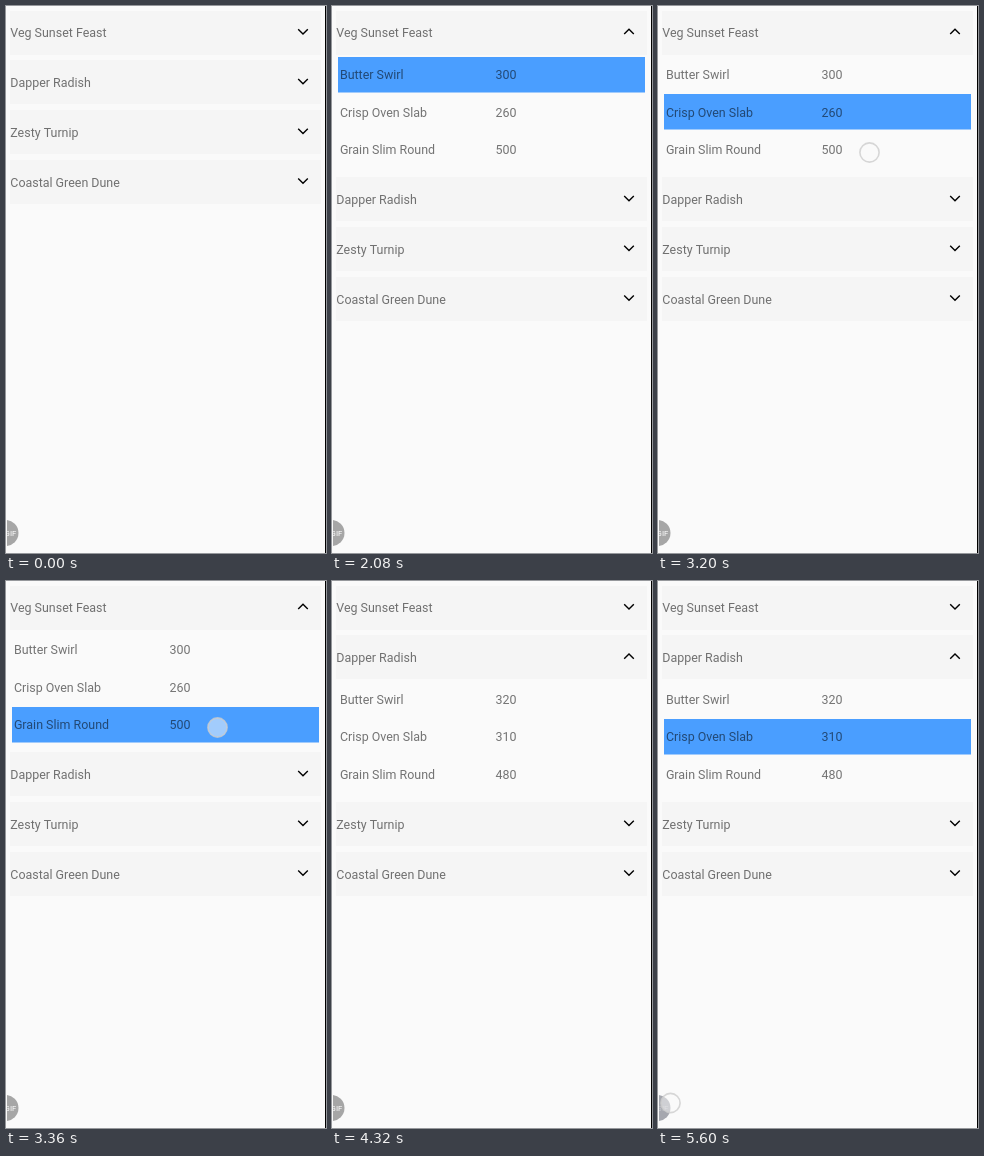
These frames come from a looping animation (320x547 px, 5.76 s). An HTML page with a canvas:

```html
<!DOCTYPE html>
<html lang="en">
<head>
<meta charset="utf-8">
<title>Expandable menu</title>
<style>
  html, body { margin: 0; width: 100%; height: 100%; overflow: hidden; background: #fafafa; }
  canvas { display: block; width: 320px; height: 547px; }
</style>
</head>
<body>
<canvas id="stage"></canvas>
<script>
const W = 320, H = 547, LOOP = 5760;
const HEADER_PITCH = 49.7, ROW_PITCH = 37.3, FULL = 117;
const INK = 'rgba(0,0,0,.54)';

const groups = [
  { name: 'Veg Sunset Feast', prices: [300, 260, 500] },
  { name: 'Dapper Radish', prices: [320, 310, 480] },
  { name: 'Zesty Turnip', prices: [] },
  { name: 'Coastal Green Dune', prices: [] }
];
const crusts = ['Butter Swirl', 'Crisp Oven Slab', 'Grain Slim Round'];

// Each step lists only what changes: section heights, active group,
// selected [group, row], and the touch point [x, y, strength].
const steps = [
  { at: 0, open: [0, 0], active: -1, selected: null, touch: null },
  { at: 320, touch: [211.5, 17.5, 1] },
  { at: 480, touch: [211.8, 17.8, 0.7] },
  { at: 640, touch: null, open: [1, 0], active: 0 },
  { at: 960, open: [8, 0] },
  { at: 1120, open: [FULL, 0] },
  { at: 1760, touch: [219.5, 63.5, 1] },
  { at: 1920, selected: [0, 0] },
  { at: 2080, touch: null },
  { at: 2560, selected: [0, 1], touch: [215, 105, 1] },
  { at: 2720, touch: null },
  { at: 3200, touch: [211.5, 146.5, 1] },
  { at: 3360, selected: [0, 2] },
  { at: 3520, touch: null },
  { at: 4000, open: [122.4, 0], active: 1, touch: [198, 198, 1] },
  { at: 4160, open: [60, 58], touch: null },
  { at: 4320, open: [0, FULL], selected: null },
  { at: 4800, selected: [1, 1], touch: [212, 156, 1] },
  { at: 4960, touch: null },
  { at: 5600, touch: [12.5, 522, 1], pressed: true }
];

const canvas = document.getElementById('stage');
const ctx = canvas.getContext('2d');
const ratio = window.devicePixelRatio || 1;
canvas.width = W * ratio;
canvas.height = H * ratio;

function stateAt(time) {
  return Object.assign({}, ...steps.filter(step => step.at <= time));
}

function rect(x, y, w, h, color) {
  ctx.fillStyle = color;
  ctx.fillRect(x, y, w, h);
}

function text(value, x, y, color = INK, font = '12.44px Roboto, sans-serif') {
  ctx.font = font;
  ctx.fillStyle = color;
  ctx.fillText(value, x, y);
}

function chevron(y, up) {
  const bend = up ? -2.4 : 2.4;
  ctx.beginPath();
  ctx.moveTo(292.2, y - bend);
  ctx.lineTo(297, y + bend);
  ctx.lineTo(301.8, y - bend);
  ctx.strokeStyle = '#000';
  ctx.lineWidth = 1.4;
  ctx.stroke();
}

function drawRows(group, index, top, height, selected) {
  ctx.save();
  ctx.beginPath();
  ctx.rect(0, top, W, height);
  ctx.clip();
  group.prices.forEach((price, row) => {
    const y = top + 1.6 + row * ROW_PITCH;
    if (selected && selected[0] === index && selected[1] === row) {
      rect(6, Math.round(y), 307, 35.5, '#4a9eff');
    }
    text(crusts[row], 7.9, y + 22.2);
    text(price, 163.6, y + 22.2);
  });
  ctx.restore();
}

function drawButton(pressed) {
  ctx.save();
  ctx.beginPath();
  ctx.rect(1, 500, 30, H - 500);
  ctx.clip();
  ctx.beginPath();
  ctx.arc(-0.5, 527, 13, 0, Math.PI * 2);
  ctx.fillStyle = pressed ? '#a5a7ae' : '#a6a6a6';
  ctx.fill();
  text('GIF', -1.4, 529.8, pressed ? '#c4c6cc' : '#fff', '7.8px Roboto, sans-serif');
  ctx.restore();
}

function drawTouch([x, y, strength]) {
  ctx.save();
  ctx.globalAlpha = strength;
  ctx.beginPath();
  ctx.arc(x, y, 9.6, 0, Math.PI * 2);
  ctx.fillStyle = 'rgba(250,250,250,.5)';
  ctx.fill();
  ctx.strokeStyle = 'rgba(205,205,205,.8)';
  ctx.lineWidth = 1.6;
  ctx.stroke();
  ctx.restore();
}

function draw(time) {
  const state = stateAt(time);
  ctx.setTransform(ratio, 0, 0, ratio, 0, 0);
  rect(0, 0, W, H, '#fafafa');

  let shift = 0;
  groups.forEach((group, i) => {
    const y = i * HEADER_PITCH + shift;
    rect(4, Math.round(y + 4.7), 311, 44, '#f5f5f5');
    text(group.name, 4.3, y + 31.4);
    chevron(y + 25.7, state.active === i);
    const height = state.open[i] || 0;
    if (height) drawRows(group, i, y + 49.4, height, state.selected);
    shift += height;
  });

  drawButton(state.pressed);
  if (state.touch) drawTouch(state.touch);
  rect(319, 0, 1, H, '#000');
}

function tick() {
  draw(performance.now() % LOOP);
  requestAnimationFrame(tick);
}
tick();
</script>
</body>
</html>
```
